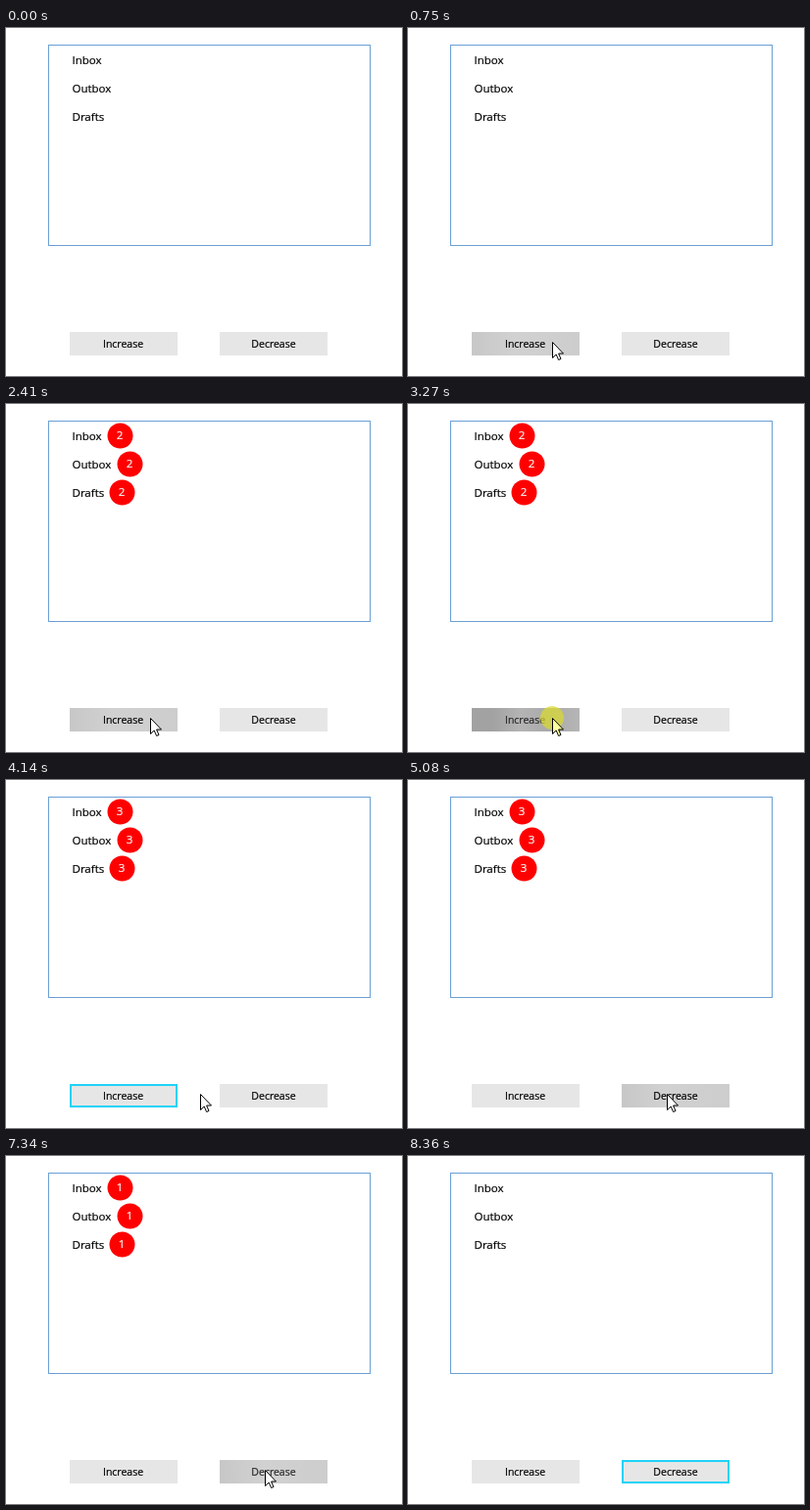
These frames come from a looping animation (404 by 356 pixels, 8750 ms). An HTML page:

```html
<!DOCTYPE html>
<html lang="en">
<head>
<meta charset="utf-8">
<title>Badge counter</title>
<style>
  html, body { margin: 0; width: 100%; height: 100%; overflow: hidden; background: #fff; }
  svg { display: block; width: 404px; height: 356px; }
  text {
    font-family: "Open Sans", "Noto Sans", sans-serif; font-size: 11.5px;
    fill: currentColor; stroke: currentColor; stroke-width: .2px;
  }
  .button text { font-size: 10.5px; text-anchor: middle; }
  .badge { color: #fff; }
  .badge circle { fill: #f00; }
  .badge text { text-anchor: middle; }
  .focus { fill: none; stroke: #1fd3f7; stroke-width: 2; }
</style>
</head>
<body>
<svg viewBox="0 0 404 356">
  <defs>
    <linearGradient id="hover">
      <stop offset="0" stop-color="#c7c7c7"/>
      <stop offset=".4" stop-color="#d1d1d1"/>
      <stop offset="1" stop-color="#cdcdcd"/>
    </linearGradient>
    <linearGradient id="press">
      <stop offset=".2" stop-color="#a2a2a2"/>
      <stop offset=".45" stop-color="#b4b4b4"/>
      <stop offset=".7" stop-color="#aaa"/>
      <stop offset="1" stop-color="#b5b5b5"/>
    </linearGradient>
  </defs>

  <rect x="43.5" y="17.5" width="328" height="205" fill="#fff" stroke="#6a9fd4"/>
  <text x="67.5" y="37">Inbox</text>
  <text x="67.5" y="66">Outbox</text>
  <text x="67.5" y="95">Drafts</text>

  <g id="badges">
    <g class="badge"><circle cx="116.5" cy="32.5" r="13"/><text x="116" y="36">1</text></g>
    <g class="badge"><circle cx="126.5" cy="61.5" r="13"/><text x="126" y="65">1</text></g>
    <g class="badge"><circle cx="118.5" cy="90.5" r="13"/><text x="118" y="94">1</text></g>
  </g>

  <g class="button" id="increase" transform="translate(65 311)">
    <rect class="face" width="110" height="24"/>
    <rect class="focus" x="1" y="1" width="108" height="22"/>
    <text x="54.5" y="16">Increase</text>
  </g>
  <g class="button" id="decrease" transform="translate(218 311)">
    <rect class="face" width="110" height="24"/>
    <rect class="focus" x="1" y="1" width="108" height="22"/>
    <text x="55" y="16">Decrease</text>
  </g>

  <g id="pointer">
    <circle id="ring" r="12" fill="#dcdc2c" fill-opacity=".7"/>
    <path id="arrow" d="M.5.5V16.5L4.2 13 6.6 18.5 9 17.5 6.6 12H11.5Z" stroke="#000"/>
  </g>
</svg>

<script>
const LOOP = 8750, STEP = 80;
const RELEASE = 100, RING = 160, SOFTEN = 550;   // ms after a press
const $ = id => document.getElementById(id);
const show = (el, on) => el.setAttribute('visibility', on ? 'visible' : 'hidden');

const buttons = [
  { el: $('increase'), x: 65, presses: [1140, 2160, 3270] },
  { el: $('decrease'), x: 218, presses: [4920, 5730, 6720, 7670] }
];

const offstage = [204, 365], onIncrease = [147, 321], onDecrease = [264, 321], below = [268, 362];
const moves = [
  { start: 360, steps: 5, from: offstage, to: onIncrease },
  { start: 4070, steps: 4, from: onIncrease, to: onDecrease },
  { start: 8120, steps: 4, from: onDecrease, to: below }
];

// The pointer eases out, sampled once per STEP
function pointerAt(t) {
  const move = moves.findLast(m => t >= m.start);
  if (!move) return offstage;
  const { start, steps, from, to } = move;
  const left = 1 - Math.min(1, (Math.floor((t - start) / STEP) + 1) / steps);
  return to.map((end, i) => end + (from[i] - end) * left * left);
}

// Label darkness: black after a release, softening to grey while hovered
function ink(presses, t) {
  const last = presses.findLast(p => t >= p + RELEASE) ?? Infinity;
  const v = 40 * Math.min(1, Math.max(0, (t - last - SOFTEN) / 100 + .4));
  return t < last + SOFTEN ? '#000' : `rgb(${v} ${v} ${v})`;
}

function drawButton({ el, x, presses }, [px, py], focused, t) {
  const over = px >= x && px < x + 110 && py >= 311 && py < 335;
  const since = t - (presses.findLast(p => t >= p) ?? -Infinity);
  const face = !over ? '#e6e6e6'
    : since < RELEASE ? 'url(#press)'
    : since < RING ? '#bababa' : 'url(#hover)';
  el.querySelector('.face').setAttribute('fill', face);
  el.querySelector('text').style.color = over ? ink(presses, t) : '#000';
  show(el.querySelector('.focus'), focused && !over);
}

function draw(t) {
  const tip = pointerAt(t);
  const focused = buttons.findLast(b => t >= b.presses[0]);
  for (const b of buttons) drawButton(b, tip, b === focused, t);

  // The first press on Decrease only moves the focus
  const [ups, downs] = buttons.map(b => b.presses.filter(p => t >= p + RELEASE).length);
  const count = ups - Math.max(0, downs - 1);
  show($('badges'), count > 0);
  for (const label of $('badges').querySelectorAll('text')) label.textContent = count;

  const lit = buttons.some(b => b.presses.some(p => t >= p && t < p + RING));
  $('pointer').setAttribute('transform', `translate(${tip.map(Math.round)})`);
  show($('pointer'), tip[1] < 356);
  show($('ring'), lit);
  $('arrow').setAttribute('fill', lit ? '#ffffa0' : '#fff');
}

const start = performance.now();
function tick() {
  draw((performance.now() - start) % LOOP);
  requestAnimationFrame(tick);
}
tick();
</script>
</body>
</html>
```
